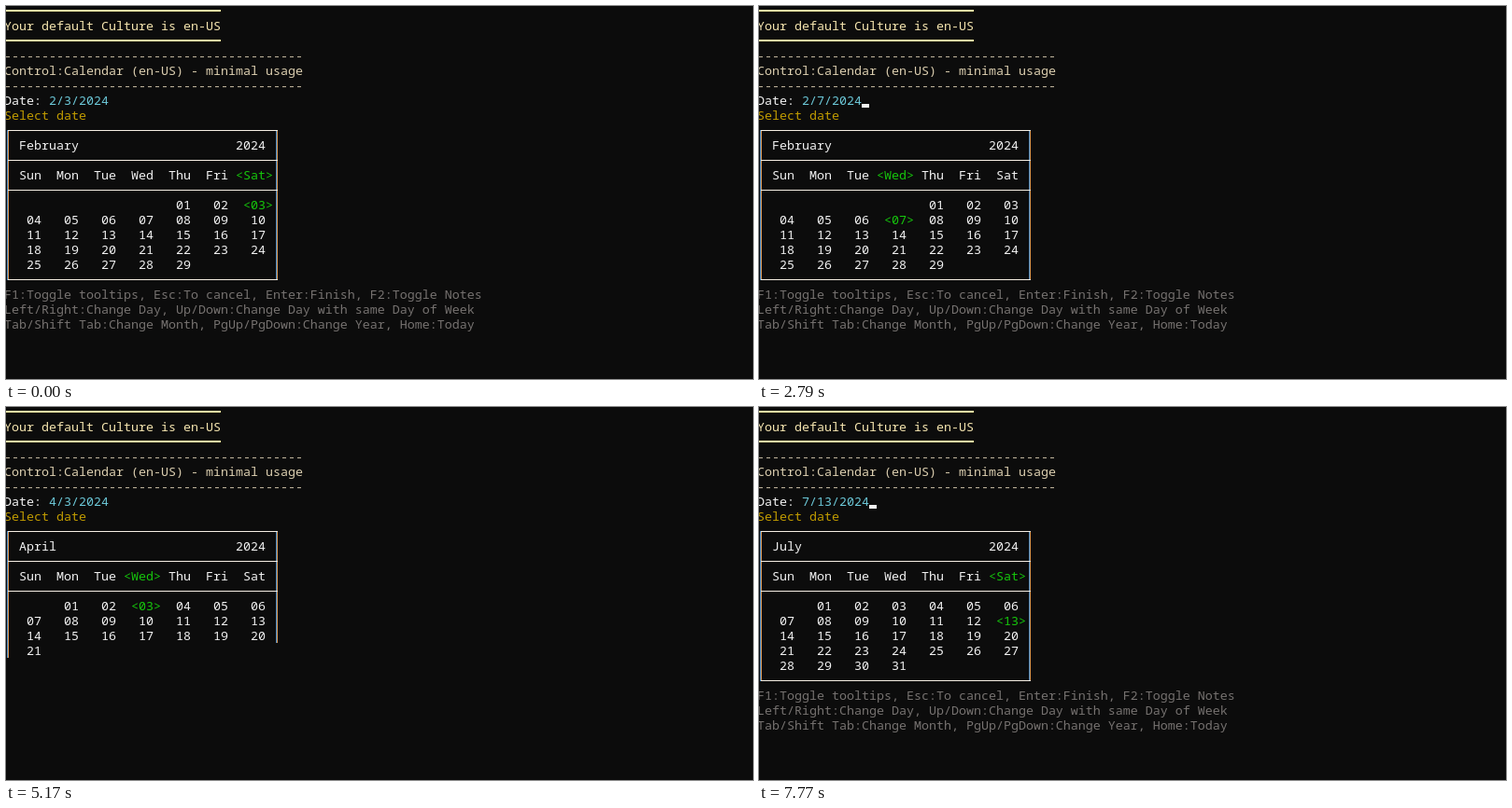
Write an HTML page that moves like this. It is 800 px wide and 400 px high and loops after 8000 ms.

```html
<!DOCTYPE html>
<html lang="en">
<head>
<meta charset="utf-8">
<title>Console calendar</title>
<style>
  html, body { margin: 0; width: 100%; height: 100%; overflow: hidden; background: #0c0c0c; }
  svg { display: block; width: 800px; height: 400px; }
  text { font: 13.333px "Noto Sans Mono", "DejaVu Sans Mono", monospace; white-space: pre; }
  rect { shape-rendering: crispEdges; }
</style>
</head>
<body>
<svg viewBox="0 0 800 400"><g id="fixed"></g><g id="live"></g></svg>
<script>
const LOOP = 8000, GAP = 200;
const MONTHS = ['January', 'February', 'March', 'April', 'May', 'June', 'July'];
const DAYS = ['Sun', 'Mon', 'Tue', 'Wed', 'Thu', 'Fri', 'Sat'];
const HELP = [
  'F1:Toggle tooltips, Esc:To cancel, Enter:Finish, F2:Toggle Notes',
  'Left/Right:Change Day, Up/Down:Change Day with same Day of Week',
  'Tab/Shift Tab:Change Month, PgUp/PgDown:Change Year, Home:Today'
];
const WHITE = '#f2f2f2', GREEN = '#16c60c', CREAM = '#f9f1a5';
const RULE = '#f6efe4', DASH = '#c8bda4';

const shiftDays = n => d => new Date(d.getFullYear(), d.getMonth(), d.getDate() + n);
const KEYS = {
  left: shiftDays(-1), right: shiftDays(1), up: shiftDays(-7), down: shiftDays(7),
  tab: d => new Date(d.getFullYear(), d.getMonth() + 1, d.getDate())
};

// Bursts of one repeated key; a slow burst is first seen half painted
const BURSTS = [
  { at: 200, key: 'right', count: 4 },
  { at: 1590, key: 'left', count: 3, gap: 195 },
  { at: 2180, key: 'right', count: 3, gap: 305 },
  { at: 2990, key: 'down', count: 4 },
  { at: 3980, key: 'down', count: 4 },
  { at: 4970, key: 'down', count: 1 },
  { at: 5170, key: 'up', count: 4, slow: true },
  { at: 6560, key: 'tab', count: 4, gap: 400 }
];

function buildSteps() {
  let date = new Date(2024, 1, 3);
  const steps = [{ at: 0, date, cursor: false }];
  for (const { at, key, count, gap = GAP, slow } of BURSTS) {
    for (let i = 0; i < count; i++) {
      date = KEYS[key](date);
      const cut = slow && i === 0;
      steps.push({ at: at + i * gap, date, cut, cursor: !cut });
    }
  }
  return steps;
}

const fixed = document.getElementById('fixed');
const live = document.getElementById('live');
const colX = col => col * 8 - 2;

function add(parent, tag, attrs, content) {
  const el = document.createElementNS('http://www.w3.org/2000/svg', tag);
  for (const key in attrs) el.setAttribute(key, attrs[key]);
  if (content) el.textContent = content;
  parent.appendChild(el);
}
function put(parent, col, row, content, fill) {
  add(parent, 'text', { x: colX(col), y: row * 16 + 10, fill }, content);
}
function box(parent, x, y, width, height, fill) {
  add(parent, 'rect', { x, y, width, height, fill });
}
function rule(row) {
  box(live, 2, row * 16 + 5, 289, 1, RULE);
}
// Subpixel-smoothed stroke: cool left pixel, warm right pixel
function side(x, endY) {
  box(live, x - 1, 133, 1, endY - 133, '#4488c4');
  box(live, x, 133, 1, endY - 133, '#dc9c58');
}

function drawFixed() {
  box(fixed, 0, 4, 230, 2, CREAM);
  put(fixed, 0, 1, 'Your default Culture is en-US', '#f6e6b0');
  box(fixed, 0, 36, 230, 2, CREAM);
  put(fixed, 0, 3, '-'.repeat(40), DASH);
  put(fixed, 0, 4, 'Control:Calendar (en-US) - minimal usage', '#dccfb0');
  put(fixed, 0, 5, '-'.repeat(40), DASH);
  put(fixed, 0, 6, 'Date:', WHITE);
  put(fixed, 0, 7, 'Select date', '#c19c00');
}

function drawCalendar({ date, cut, cursor }) {
  live.replaceChildren();
  const year = date.getFullYear(), month = date.getMonth(), day = date.getDate();
  const first = new Date(year, month, 1).getDay();
  const count = new Date(year, month + 1, 0).getDate();
  const bottom = 13 + Math.ceil((first + count) / 7);
  const value = `${month + 1}/${day}/${year}`;

  put(live, 6, 6, value, '#6cc8d8');
  if (cursor) box(live, colX(6 + value.length), 105, 8, 4, WHITE);

  side(2, cut ? 269 : bottom * 16 + 6);
  side(290, cut ? 253 : bottom * 16 + 6);
  [8, 10, 12].forEach(rule);
  put(live, 2, 9, MONTHS[month], WHITE);
  put(live, 31, 9, String(year), WHITE);

  const cell = (col, row, label, picked) => picked
    ? put(live, col - 1, row, `<${label}>`, GREEN)
    : put(live, col, row, label, WHITE);

  DAYS.forEach((name, i) => cell(2 + i * 5, 11, name, i === date.getDay()));
  const last = cut ? 21 : count;
  for (let d = 1; d <= last; d++) {
    const slot = first + d - 1;
    cell(3 + slot % 7 * 5, 13 + Math.floor(slot / 7), String(d).padStart(2, '0'), d === day);
  }
  if (cut) return;
  rule(bottom);
  HELP.forEach((line, i) => put(live, 0, bottom + 1 + i, line, '#767270'));
}

const steps = buildSteps();
let shown = null;
function tick() {
  const t = performance.now() % LOOP;
  const step = steps.findLast(s => s.at <= t);
  if (step !== shown) drawCalendar(shown = step);
  requestAnimationFrame(tick);
}
drawFixed();
tick();
</script>
</body>
</html>
```
